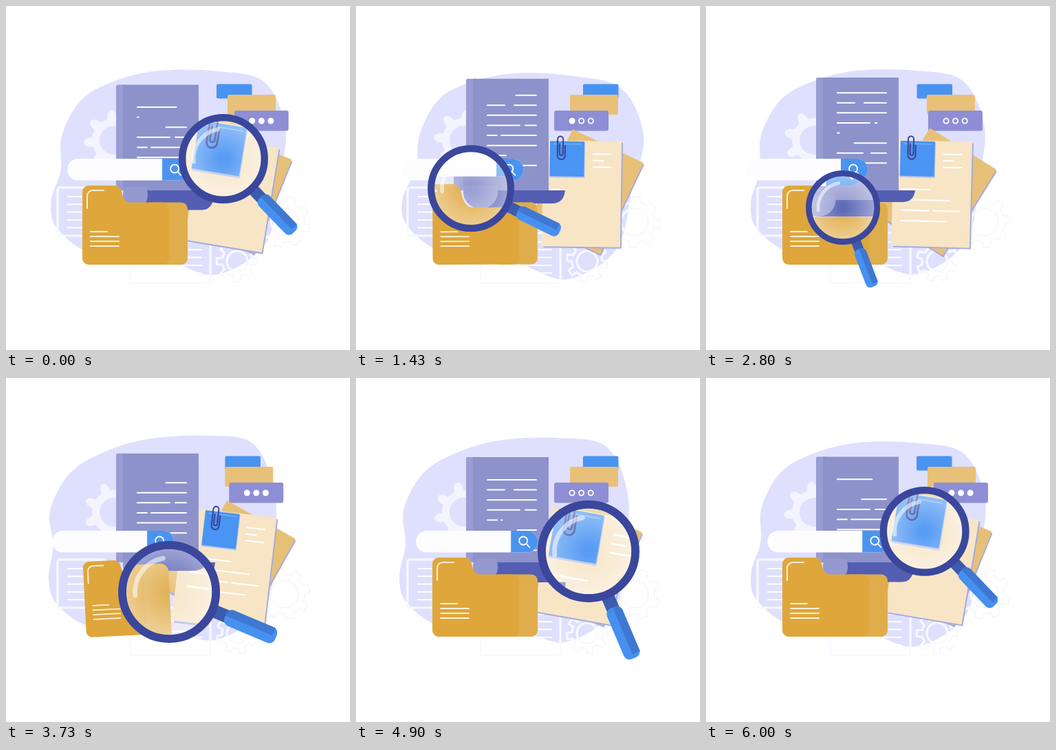
Write an HTML page with a canvas that moves like this. It is 500 px wide and 500 px high and loops after 6030 ms.

```html
<!DOCTYPE html>
<html lang="en">
<head>
<meta charset="utf-8">
<title>File search</title>
<style>
html, body { margin: 0; width: 100%; height: 100%; overflow: hidden; background: #fff; }
canvas { display: block; }
</style>
</head>
<body>
<canvas id="stage" width="500" height="500"></canvas>
<script>
const ctx = document.getElementById('stage').getContext('2d');
const LOOP = 6030, HALF = LOOP / 2, THIRD = LOOP / 3;

const mod = (a, n) => ((a % n) + n) % n;
const clamp = x => Math.max(0, Math.min(1, x));
const rad = d => d * Math.PI / 180;
const ease = x => .5 - .5 * Math.cos(Math.PI * clamp(x));

// Eases 0 to 1 from time up, holds, then eases back from time down
function wave(t, up, upLen, down, downLen, period = LOOP) {
  const p = mod(t - up, period), hold = mod(down - up, period);
  return p < hold ? ease(p / upLen) : 1 - ease((p - hold) / downLen);
}

function box(x, y, w, h, r, color) {
  ctx.beginPath();
  ctx.roundRect(x, y, w, h, r);
  ctx.fillStyle = color;
  ctx.fill();
}

function disc(x, y, r, color) {
  ctx.beginPath();
  ctx.arc(x, y, r, 0, 7);
  ctx.fillStyle = color;
  ctx.fill();
}

function stroke(color, width) {
  ctx.strokeStyle = color;
  ctx.lineWidth = width;
  ctx.lineCap = ctx.lineJoin = 'round';
  ctx.stroke();
}

function line(x1, x2, y, width = 2, color = '#fff') {
  if (x2 <= x1) return;
  ctx.beginPath();
  ctx.moveTo(x1, y);
  ctx.lineTo(x2, y);
  stroke(color, width);
}

// A text line from a to b, broken by an optional gap
function textLine(a, b, y, gap) {
  if (!gap) return line(a, b, y);
  line(a, Math.min(b, gap[0]), y);
  line(Math.max(a, gap[1]), b, y);
}

function turned(x, y, deg, draw) {
  ctx.save();
  ctx.translate(x, y);
  ctx.rotate(rad(deg));
  draw();
  ctx.restore();
}

function paleOutline() {
  stroke('#fff', 3);
  stroke('#ebecfe', .8);
}

// Closed smooth shape that leans up and to the left
const BLOB = [[94, 185], [122, 135], [170, 110], [235, 98], [320, 103], [388, 122], [419, 190], [402, 265],
  [378, 355], [305, 398], [225, 370], [130, 360], [75, 320], [68, 280], [88, 235]];

function blob(t) {
  const lean = wave(t, 1930, 1800, 3730, 4230);
  const p = k => {
    const [x, y] = BLOB[mod(k, BLOB.length)];
    return [x - 30 * lean * clamp((300 - y) / 100), y - .12 * lean * (x - 160)];
  };
  ctx.beginPath();
  ctx.moveTo(...p(0));
  BLOB.forEach((_, k) => {
    const [a, b, c, d] = [p(k - 1), p(k), p(k + 1), p(k + 2)];
    ctx.bezierCurveTo(b[0] + (c[0] - a[0]) / 6, b[1] + (c[1] - a[1]) / 6,
      c[0] - (d[0] - b[0]) / 6, c[1] - (d[1] - b[1]) / 6, ...c);
  });
  ctx.fillStyle = '#dfe0fd';
  ctx.fill();
}

function gearPath(r, tip) {
  ctx.beginPath();
  for (let i = 0; i < 8; i++) {
    const a = i * Math.PI / 4;
    for (const [da, q] of [[-.22, r], [-.15, tip], [.15, tip], [.22, r], [.4, r]])
      ctx.lineTo(q * Math.cos(a + da), q * Math.sin(a + da));
  }
  ctx.closePath();
}

function outlineGear(x, y, r, deg) {
  turned(x, y, deg, () => {
    gearPath(r, r + 8);
    paleOutline();
    ctx.beginPath();
    ctx.arc(0, 0, r * .68, 0, 7);
    paleOutline();
  });
}

function gears(t) {
  const spin = 45 * t / LOOP;
  turned(157, 195, 175 + spin, () => {
    gearPath(32, 40);
    ctx.moveTo(21, 0);
    ctx.arc(0, 0, 21, 0, 7);
    ctx.fillStyle = '#f4f4ff';
    ctx.fill('evenodd');
    for (let a = 0; a < 6; a += Math.PI / 4)
      disc(39 * Math.cos(a), 39 * Math.sin(a), 5, '#f4f4ff');
  });
  outlineGear(405, 314, 29, 15 - spin);
  outlineGear(336, 371, 22, spin);
}

function faintPage(x, y, w, h) {
  ctx.beginPath();
  ctx.roundRect(x, y, w, h, 3);
  paleOutline();
  for (let dy = 13; dy < h - 10; dy += 11.3) line(x + 15, x + w - 13, y + dy);
}

function cards(t) {
  const shift = delay => wave(t, 180 + delay, 1050, 1850 + delay, 1050, HALF);
  box(306 + 24 * shift(0), 113.5, 51.5, 21, 2, '#4893f2');
  box(322 - 11 * shift(120), 129, 70, 29, 2, '#e8c077');
  const x = 333 - 45 * shift(230);
  box(x, 152, 79, 29.5, 3, '#8e8ed6');
  for (let i = 0; i < 3; i++) {
    const cx = x + 26 + 13.6 * i;
    disc(cx, 167, 4.5, '#fff');
    if (mod(t - 450 - 100 * i, THIRD) < 950) disc(cx, 167, 2.7, '#8e8ed6');
  }
}

function paper(x, y, deg, h, color, draw) {
  turned(x, y, deg, () => {
    box(-54.5, -h / 2 + 2, 113.5, h, 1, '#a5abdf');
    box(-57, -h / 2, 114, h, 1, color);
    if (draw) draw();
  });
}

function sheetText(t) {
  const widths = [26, 15, 26, 41, 70, 85, 67];
  widths.forEach((w, i) => {
    const top = i < 3, x = top ? 16 : -44, y = top ? 9.5 * i - 58 : 15.3 * (i - 3) - 6;
    const from = x + w * clamp((t - 5520 + 170 * i) / 300);
    const to = x + w * clamp((t - 650 - 230 * i) / 300);
    textLine(from, to, y, i === 5 && [-3, 3]);
  });
}

function stickyNote() {
  box(-47, -75, 51, 52, 1, '#b9c3ea');
  box(-47, -76, 50, 51, 1, '#4a94f3');
  line(-42, -1, -72, 1, '#8bbcf8');
  ctx.beginPath();
  ctx.moveTo(-25, -70);
  ctx.lineTo(-25, -55);
  ctx.arc(-30.5, -55, 5.5, 0, Math.PI);
  ctx.lineTo(-36, -78);
  ctx.arc(-32, -79, 4, Math.PI, 0);
  ctx.lineTo(-28, -58);
  ctx.arc(-30.5, -58, 2.5, 0, Math.PI);
  ctx.lineTo(-33, -72);
  stroke('#3b4493', 2);
}

function sheets(t) {
  paper(335, 270, 22 + 10 * wave(t, 800, 1600, 2900, 2400), 147, '#e7c078');
  paper(328, 273, .5 + 9.5 * wave(t, 2300, 2400, 5700, 2000), 154, '#f7e5c6', () => {
    sheetText(t);
    stickyNote();
  });
}

function scroll(t) {
  const lift = wave(t, 2700, 2000, 5700, 2400), top = 104 + 11 * lift, h = 17 + 12 * lift;
  ctx.beginPath();
  ctx.moveTo(187, 268);
  ctx.lineTo(304, 268);
  ctx.quadraticCurveTo(302, 268 + h, 285, 268 + h);
  ctx.lineTo(187, 268 + h);
  ctx.fillStyle = '#545eb3';
  ctx.fill();
  box(160, top, 14, 268 - top, [2, 0, 0, 4], '#999dd3');
  box(170, top, 110, 268 - top, 0, '#8d92cb');
  ctx.beginPath();
  ctx.ellipse(188, 268 + h / 2 - 8, 18, h / 2 + 8, 0, 0, 7);
  ctx.fillStyle = '#9499d0';
  ctx.fill();
  box(170, 225, 35, 38, 0, '#8d92cb');

  const left = 191, width = 71, gaps = { 1: [216, 230], 3: [238, 246], 4: [205, 211], 6: [228, 240] };
  for (let i = 0; i < 8; i++) {
    const y = 126 + 22 * lift + 14.6 * i;
    if (y > 264) break;
    const p = mod(t - 1235 - 290 * i, THIRD), wait = 505 - 28 * i;
    if (p < 335) textLine(left + width * p / 335, left + width, y, gaps[i]);
    else textLine(left, left + width * clamp((p - wait) / 340), y, gaps[i]);
  }
}

function folder(t) {
  const open = wave(t, 200, 600, 950, 600, HALF);
  turned(188, 321, -3 * open, () => {
    const size = 1 - .045 * open;
    ctx.scale(size, size);
    ctx.translate(-188, -321);
    box(200, 285.5, 64, 90.5, 9, '#e0ad4c');
    ctx.beginPath();
    ctx.moveTo(111, 270);
    ctx.arcTo(111, 261, 122, 261, 9);
    ctx.lineTo(158, 261);
    ctx.quadraticCurveTo(166, 261, 168, 270);
    ctx.quadraticCurveTo(171, 285.5, 180, 285.5);
    ctx.arcTo(237, 285.5, 237, 296, 9);
    ctx.arcTo(237, 376, 228, 376, 9);
    ctx.arcTo(111, 376, 111, 367, 9);
    ctx.closePath();
    ctx.fillStyle = '#dfa63c';
    ctx.fill();
    ctx.beginPath();
    ctx.moveTo(118, 294);
    ctx.arcTo(118, 268, 142, 268, 8);
    ctx.lineTo(142, 268);
    stroke('#fdf1d8', 2);
    for (let i = 0; i < 4; i++) line(123, i ? 164 : 147, 328 + 7 * i, 1.8, '#fdf1d8');
  });
}

function searchBar(t) {
  const x = 58 + 32 * wave(t, 2800, 2600, 5750, 2600);
  box(x, 222, 177, 31.5, 15.7, '#fdfdff');
  box(x + 138, 222, 39, 31.5, [0, 15.7, 15.7, 0], '#4a94f0');
  ctx.beginPath();
  ctx.arc(x + 156, 236.5, 6, 0, 7);
  ctx.moveTo(x + 160.5, 241);
  ctx.lineTo(x + 165, 246);
  stroke('#fff', 1.8);
}

function scene(t) {
  blob(t);
  gears(t);
  faintPage(75, 264, 70, 70);
  faintPage(181, 330, 116, 73);
  cards(t);
  sheets(t);
  scroll(t);
  folder(t);
  searchBar(t);
}

// Lens poses: time, x, y, radius, angle, then the magnification's fixed point relative to the centre
const POSES = [
  [0, 316, 222, 65, 46, 10, 30],
  [900, 220, 188.5, 77, 38, 30, 34],
  [1930, 138, 335, 49, 22, 44, -31],
  [2800, 199, 293, 54, 69, 51, -60],
  [3200, 212, 307, 60, 55, 62, -25],
  [3730, 237, 311, 74, 23, 80, 8],
  [4900, 338, 252, 74, 67, -36, -56]
];

// Smooth periodic curve through the poses
function lensPose(t) {
  const n = POSES.length, i = POSES.findLastIndex(p => p[0] <= t);
  const pose = k => POSES[mod(k, n)], time = k => pose(k)[0] + LOOP * Math.floor(k / n);
  const d = time(i + 1) - time(i), u = (t - time(i)) / d, u2 = u * u, u3 = u2 * u;
  return [1, 2, 3, 4, 5, 6].map(j => {
    const slope = k => (pose(k + 1)[j] - pose(k - 1)[j]) / (time(k + 1) - time(k - 1));
    return pose(i)[j] + (pose(i + 1)[j] - pose(i)[j]) * (3 * u2 - 2 * u3)
      + d * (slope(i) * (u3 - 2 * u2 + u) + slope(i + 1) * (u3 - u2));
  });
}

function lens(t) {
  const [x, y, r, angle, dx, dy] = lensPose(t);
  turned(x, y, angle, () => {
    box(r * .96, -r * .13, r * .35, r * .26, 2, '#3c5cae');
    box(r * 1.2, -r * .165, r * 1.08, r * .33, r * .12, '#4690f0');
    box(r * 1.2, -r * .165, r * 1.0, r * .16, [r * .12, 0, 0, 0], '#3f78d2');
  });

  ctx.save();
  ctx.beginPath();
  ctx.arc(x, y, r * .92, 0, 7);
  ctx.clip();
  ctx.fillStyle = '#fff';
  ctx.fill();
  ctx.save();
  ctx.translate(x + dx, y + dy);
  ctx.scale(1.4, 1.4);
  ctx.translate(-x - dx, -y - dy);
  scene(t);
  ctx.restore();
  const haze = ctx.createRadialGradient(x, y, r * .1, x, y, r);
  haze.addColorStop(0, 'rgba(255,255,255,.08)');
  haze.addColorStop(1, 'rgba(255,255,255,.5)');
  ctx.fillStyle = haze;
  ctx.fillRect(x - r, y - r, 2 * r, 2 * r);
  ctx.restore();

  ctx.beginPath();
  ctx.arc(x, y, r * .67, rad(174), rad(260));
  stroke('rgba(255,255,255,.55)', r * .09);
  ctx.beginPath();
  ctx.arc(x, y, r * .92, 0, 7);
  stroke('#3a479c', r * .16);
}

function frame() {
  const t = performance.now() % LOOP;
  ctx.clearRect(0, 0, 500, 500);
  scene(t);
  lens(t);
  requestAnimationFrame(frame);
}
frame();
</script>
</body>
</html>
```
